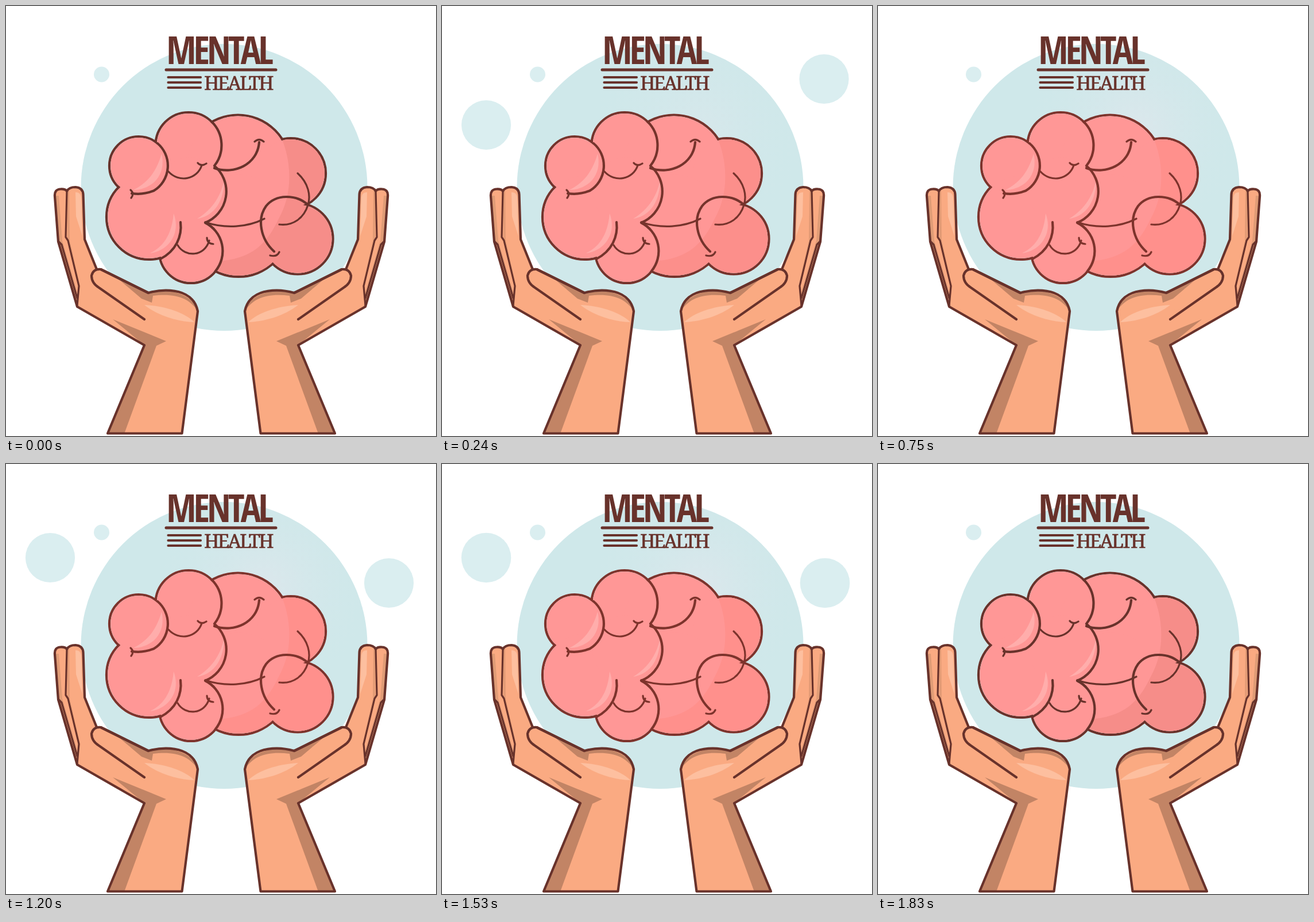
These frames come from a looping animation (749x748 px, 1.86 s). An HTML page:

```html
<!DOCTYPE html>
<html lang="en">
<head>
<meta charset="utf-8">
<title>Mental health</title>
<style>
html, body { margin: 0; width: 100%; height: 100%; overflow: hidden; background: #fff; }
svg { display: block; width: 100vw; height: 100vh; }
.line { fill: none; stroke: #68322b; stroke-width: 4.2; stroke-linecap: round; stroke-linejoin: round; }
.bar { stroke-width: 5; }
.fine { stroke-width: 3.2; }
.tone { fill: #c28465; }
.glow { fill: #fdbf9f; }
.big { font: 600 66px 'Open Sans Condensed', 'Open Sans', sans-serif; font-stretch: condensed; letter-spacing: -4.5px; }
.slab { font: 500 33px 'Noto Serif', serif; letter-spacing: -2.7px; stroke: #68322b; stroke-width: .7; }
</style>
</head>
<body>
<svg viewBox="0 0 749 748" preserveAspectRatio="none">
  <defs>
    <radialGradient id="haze" gradientUnits="userSpaceOnUse" cx="450" cy="215" r="190">
      <stop offset="0" stop-color="#dce7ec"/>
      <stop offset="1" stop-color="#d0e8ea" stop-opacity="0"/>
    </radialGradient>
    <clipPath id="inside"></clipPath>
    <path id="palm" d="M124 523L91 410L85 331Q84 319 95 318.500Q103 318 106 322Q110 315 121 315Q134 316 134.500 328L137 406L158 458L165 458L248 499C276 491 300 495 313 502C326 509 332 520 334 531L306.500 743.500H177L241 590Z"/>
    <clipPath id="skin"><use href="#palm"/></clipPath>
    <g id="hand">
      <use href="#palm" fill="#faaa82"/>
      <g clip-path="url(#skin)">
        <path class="tone" d="M186 545L279 583L262 591L206 744H170L241 590Z"/>
        <path class="tone" d="M190 470L248 499C282 490 326 500 334 531C318 505 290 500 256 504L254 516L236 509Z"/>
        <path fill="#e09c76" d="M85 330L92 330L98 408L126 505L124 523L91 410Z"/>
        <path fill="#e39b75" d="M107 322L110 322L111 408L129 487L125 520L127 486L107 407Z"/>
        <path class="glow" d="M121 324Q130 324 131 333L133 400L122 366Z"/>
        <path class="glow" d="M241 520C278 522 312 534 328 550C302 549 266 540 241 520Z"/>
      </g>
      <path d="M242 545L162 490Q149 482 149 469Q152 457 165 458L216 492Z" fill="#faaa82"/>
      <use href="#palm" class="line"/>
      <path class="line fine" d="M106 322L104 402L108 408L127 487L124 521M91 409L97 415L124 508"/>
      <path class="line" d="M241 545L162 490Q149 482 149 469Q152 457 165 458L248 499"/>
    </g>
  </defs>

  <circle cx="380" cy="315.500" r="249.500" fill="#cfe8ea"/>
  <circle class="warm" cx="380" cy="315.500" r="249.500" fill="url(#haze)"/>
  <g id="bubbles" fill="#daeef0">
    <circle cx="166.500" cy="119" r="13.500"/>
  </g>

  <g fill="#68322b" text-anchor="middle">
    <text class="big" x="370.500" y="101">MENTAL</text>
    <text class="slab" x="404.500" y="145.500">HEALTH</text>
  </g>
  <path class="line bar" d="M279 111H470"/>
  <path class="line" d="M282.500 124H339M282.500 133H339M282.500 142H339"/>

  <g id="rim" class="line"></g>
  <g id="flesh" fill="#ff9796"></g>
  <g clip-path="url(#inside)">
    <path id="shade" d="M478 225C500 275 498 330 475 370C455 412 430 441 366 444V490H590V220Z"/>
    <circle cx="322" cy="427" r="55" fill="#ff9796"/>
    <g fill="#ffadab">
      <path d="M271 257C262 289 246 308 222 320C252 320 280 296 271 257Z"/>
      <path d="M380 302C374 335 355 357 333 370C356 367 380 347 380 302Z"/>
      <path d="M292 361C289 395 276 418 251 430C280 427 306 398 292 361Z"/>
    </g>
  </g>
  <g class="line" id="folds">
    <path d="M358.500 201.500A57.500 57.500 0 0 1 363 278A58.500 58.500 0 0 1 347 377A55 55 0 0 1 365 461"/>
    <path d="M264 239A51 51 0 0 1 258 321Q240 329 219 326"/>
    <path d="M304 376C307 401 296 426 269 440"/>
    <path d="M363 282C397 294 438 276 441 237"/>
    <path d="M526 346C505 327 470 327 453 348C437 370 443 405 467 427"/>
    <path class="fine" d="M217 320Q224 326 218 334M283 288C301 308 333 302 341 277M334 273Q340 280 349 274M433 236Q441 229 449 236M347 376C382 388 421 385 450 370M299 416C312 438 346 436 354 408M350 403Q350 413 361 414M508 291C527 308 531 330 526 346C519 369 500 383 476 380M460 434Q472 437 476 428"/>
  </g>

  <use href="#hand"/>
  <use href="#hand" transform="translate(750 0) scale(-1 1)"/>
</svg>
<script>
const LOOP = 1860, STEP = 30, FULL = 44;
// x, y, start of the pop, first visible time
const spots = [
  [77, 207, 0, 0], [665.5, 127, 0, 0],
  [77, 163, 960, 1200], [667, 207, 960, 1200]
];
// x, y, radius of each brain lobe
const lobes = [
  [231, 278, 51], [318, 242.5, 57.5], [404, 281, 91.5],
  [496, 291, 61], [508, 405, 61.5], [405, 381, 90],
  [322, 427, 55], [249, 367, 74], [321, 322, 61]
];
const $ = id => document.getElementById(id);
const clamp = v => Math.min(1, Math.max(0, v));
const mix = (a, b, k) => `rgb(${a.map((v, i) => v + (b[i] - v) * k)})`;

function circle(parent, x, y, r) {
  const dot = document.createElementNS('http://www.w3.org/2000/svg', 'circle');
  dot.setAttribute('cx', x);
  dot.setAttribute('cy', y);
  dot.setAttribute('r', r);
  return $(parent).appendChild(dot);
}

// Fills slightly smaller than the rims leave only the outer outline.
for (const [x, y, r] of lobes) {
  circle('rim', x, y, r);
  circle('flesh', x, y, r - 2.1);
  circle('inside', x, y, r - 2.1);
}
const dots = spots.map(([x, y]) => circle('bubbles', x, y, 0));

function radius(t) {
  const grow = 1 - (1 - clamp(t / 330)) ** 3;
  const shrink = 1 - clamp((t - 510) / 240) ** 3;
  return FULL * grow * shrink;
}

function draw(t) {
  spots.forEach(([, , start, from], i) =>
    dots[i].setAttribute('r', t < from ? 0 : radius(t - start)));
  const warm = clamp(t / 390) * clamp((1830 - t) / 300);
  document.querySelector('.warm').style.opacity = warm;
  $('shade').style.fill = mix([246, 141, 137], [255, 144, 140], warm);
  $('rim').style.stroke = $('folds').style.stroke = mix([104, 50, 43], [125, 51, 44], warm);
}

const origin = performance.now();
function tick() {
  const t = (performance.now() - origin) % LOOP;
  draw(Math.floor(t / STEP) * STEP);
  requestAnimationFrame(tick);
}
draw(0);
requestAnimationFrame(tick);
</script>
</body>
</html>
```
